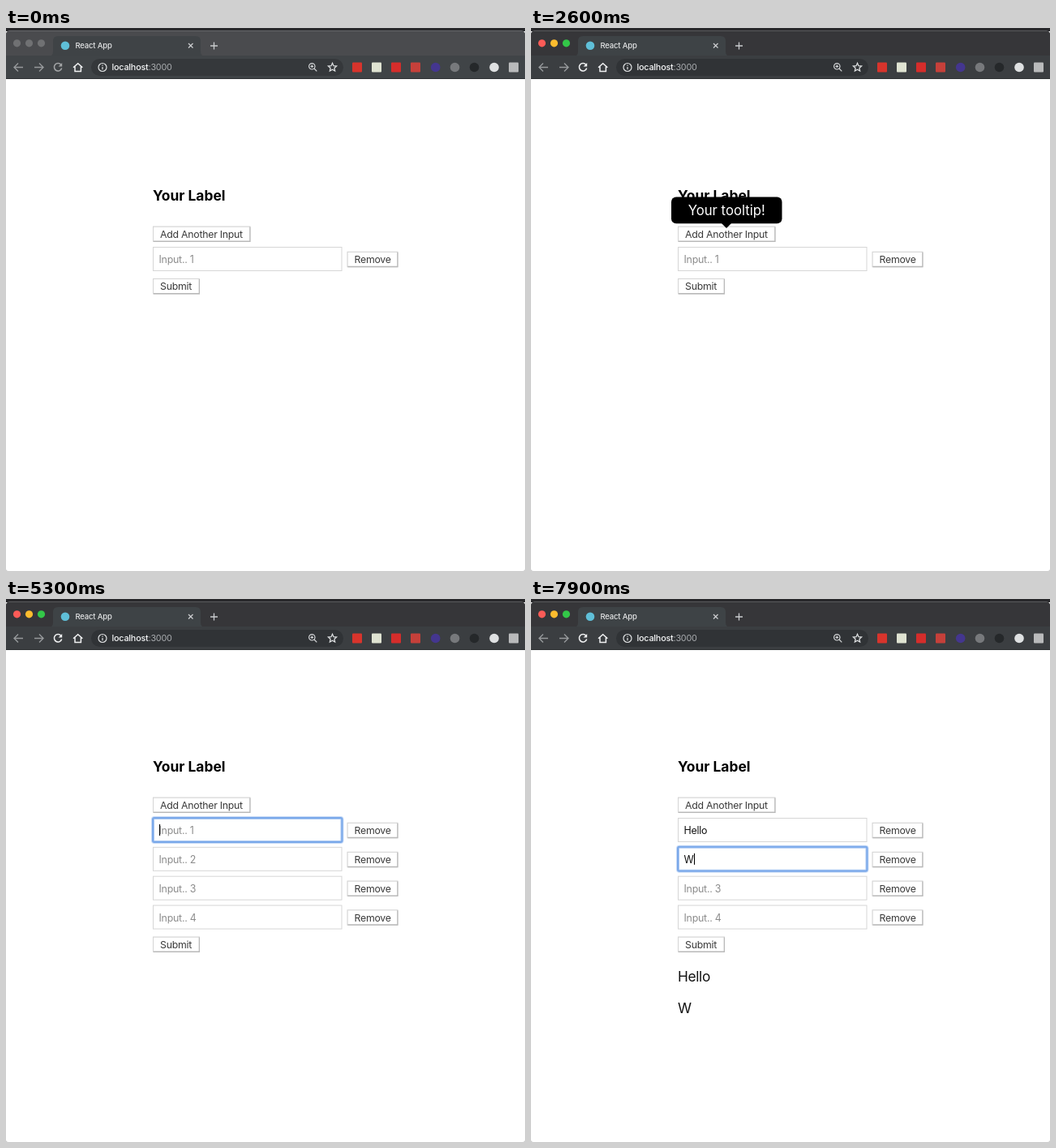
An HTML page with a canvas that plays this animation: 640 by 670 pixels, repeating every 8000 ms.

```html
<!DOCTYPE html>
<html lang="en">
<head>
<meta charset="utf-8">
<title>Dynamic inputs</title>
<style>
  html, body { margin: 0; width: 640px; height: 670px; overflow: hidden; background: #fff; }
  canvas { display: block; width: 640px; height: 670px; }
</style>
</head>
<body>
<canvas id="stage"></canvas>
<script>
const W = 640, H = 670, LOOP = 8000, ROW = 35.85;
const canvas = document.getElementById('stage');
const ctx = canvas.getContext('2d');
const dpr = window.devicePixelRatio || 1;
canvas.width = W * dpr;
canvas.height = H * dpr;

// Timeline, in milliseconds
const ACTIVE = 1000;
const TOOLTIP = [1200, 4950];
const ADDED = [0, 2900, 3700, 4600];
const FOCUS = [5200, 7000];
const TYPING = [
  { word: 'Hello', times: [5650, 5850, 5980, 6100, 6300] },
  { word: 'W', times: [7700] }
];

const passed = (times, t) => times.filter(at => at <= t).length;

function box(x, y, w, h, fill, r = 0) {
  ctx.fillStyle = fill;
  ctx.beginPath();
  ctx.roundRect(x, y, w, h, r);
  ctx.fill();
}

function outline(x, y, w, h, color) {
  ctx.strokeStyle = color;
  ctx.lineWidth = 1;
  ctx.strokeRect(x, y, w, h);
}

function dot(x, y, r, fill) {
  ctx.fillStyle = fill;
  ctx.beginPath();
  ctx.arc(x, y, r, 0, Math.PI * 2);
  ctx.fill();
}

function stroke(path, color, width = 1.4) {
  ctx.strokeStyle = color;
  ctx.lineWidth = width;
  ctx.stroke(new Path2D(path));
}

function text(str, x, y, size, color, { weight = 400, align = 'left', tracking = -0.02 } = {}) {
  ctx.font = `${weight} ${size}px Inter, sans-serif`;
  ctx.letterSpacing = `${tracking * size}px`;
  ctx.textAlign = align;
  ctx.fillStyle = color;
  ctx.fillText(str, x, y);
  return ctx.measureText(str).width;
}

function drawTabs(active) {
  box(0, 0, W, 4, '#28282b');
  box(0, 3, W, 32, active ? '#5a5b5d' : '#66676a', [5, 5, 0, 0]);
  box(0, 4, W, 31, active ? '#363639' : '#4a4b4e', [4, 4, 0, 0]);
  const lights = active ? ['#fc5b57', '#fdbc2e', '#33c748'] : Array(3).fill('#707173');
  lights.forEach((color, i) => dot(13.5 + 15 * i, 18.8, 4.6, color));

  ctx.fillStyle = active ? '#3e4346' : '#3f4346';
  ctx.fill(new Path2D('M52 35Q58 35 58 29V16Q58 10 64 10H234Q240 10 240 16V29Q240 35 246 35Z'));
  dot(73, 21.7, 5.3, '#5fbfd8');
  text('React App', 85.5, 25, 9.5, '#e4e5e6', { weight: 500 });
  stroke('M225 19l5.5 5.5M230.500 19l-5.5 5.5', '#cfd1d3', 1.2);
  stroke('M252 22h9M256.500 17.500v9', '#c9cbcd', 1.3);
}

function drawToolbar(active) {
  box(0, 34, W, 29, active ? '#3b3e41' : '#404447');
  box(0, 62, W, 1, '#2f3234');
  box(105, 38, 311, 21, active ? '#303336' : '#35383b', 10.5);

  const dim = '#96999b', bright = '#f1f2f3';
  stroke('M21 48.500H10.500M15 43.500l-5 5 5 5', dim);
  stroke('M35 48.500H45.500M41 43.500l5 5-5 5', dim);
  const reload = active ? bright : '#a3a5a7';
  stroke('M67.800 45.300A4.700 4.700 0 1 0 68.700 49.500', reload, 1.5);
  ctx.fillStyle = reload;
  ctx.fill(new Path2D('M69.200 43v4.600h-4.600z'));
  stroke('M83 48.800l5.700-5 5.700 5M85 47.500v6h7.400v-6', bright, 1.5);

  stroke('M124 48.500a5 5 0 1 1-10 0a5 5 0 1 1 10 0M119 48v3.300M119 45.600v1.200', '#e1e3e4', 1.2);
  const hostWidth = text('localhost', 130.5, 52, 10.8, '#f6f7f8', { weight: 500 });
  text(':3000', 130.5 + hostWidth, 52, 10.8, '#a9acaf');

  stroke('M381 47.300a3.700 3.700 0 1 1-7.400 0a3.700 3.700 0 1 1 7.400 0M380 50l3.300 3.400M375.500 47.300h3.600M377.300 45.500v3.600', '#d3d5d7', 1.2);
  drawStar(402.5, 48.7, 5.4);
  drawExtensions();
}

function drawStar(x, y, r) {
  ctx.strokeStyle = '#e1e3e4';
  ctx.lineWidth = 1.2;
  ctx.beginPath();
  for (let i = 0; i < 10; i++) {
    const a = i * Math.PI / 5 - Math.PI / 2;
    const d = i % 2 ? r * 0.46 : r;
    ctx.lineTo(x + d * Math.cos(a), y + d * Math.sin(a));
  }
  ctx.closePath();
  ctx.stroke();
}

function drawExtensions() {
  const squares = [[427, '#d8342c'], [451, '#dfe3d2'], [475, '#d52d2b'], [499, '#c6403a'], [620, '#b9babb']];
  squares.forEach(([x, color]) => box(x, 42.5, 12, 12, color, 1));
  const circles = [[529.7, '#44368f'], [553.5, '#77797c'], [577.5, '#25282a'], [602, '#dfe1e2']];
  circles.forEach(([x, color]) => dot(x, 48.5, 5.8, color));
}

// Soft blue halo around a focused control
function drawRing(x, y, w, h, color) {
  ctx.globalAlpha = 0.4;
  box(x - 3, y - 3, w + 6, h + 6, color, 4);
  ctx.globalAlpha = 1;
  box(x - 2, y - 2, w + 4, h + 4, color, 3);
}

function drawButton(label, x, y, w, focused) {
  const h = 19.5;
  if (focused) drawRing(x, y, w, h, '#8fb2f5');
  box(x, y, w, h, '#d4d4d4');
  box(x + 1, y + 1, w - 1, h - 1, '#b9b9b9');
  box(x + 1, y + 1, w - 2.3, h - 2.5, '#fff');
  text(label, x + 9, y + 14.3, 12.3, '#3a3a3a');
}

function drawInput(index, value, focused, caret) {
  const x = 181, y = 270 + ROW * index, w = 233.5, h = 30;
  if (focused) {
    drawRing(x + 1, y + 1, w - 2, h - 2, '#7ba9ea');
    box(x + 1, y + 1, w - 2, h - 2, '#a9c7f2', 1);
    box(x + 2, y + 2, w - 4, h - 4, '#fff');
  } else {
    outline(x + 0.5, y + 0.5, w - 1, h - 1, '#d6d6d6');
  }
  const width = text(value || `Input.. ${index + 1}`, 188.5, y + 20, 12.4, value ? '#111' : '#8c8c8c');
  if (caret) box(189 + (value ? width : 0), y + 8, 1.1, 14, '#000');
}

function drawTooltip() {
  box(173, 208.5, 136.5, 32.7, '#000', 6);
  ctx.fillStyle = '#000';
  ctx.fill(new Path2D('M234.500 240.500h13l-6.500 6.500z'));
  text('Your tooltip!', 241.2, 231.3, 16.7, '#fff', { align: 'center', tracking: 0 });
}

function drawForm(t) {
  const rows = passed(ADDED, t);
  const focus = passed(FOCUS, t) - 1;
  const values = TYPING.map(({ word, times }) => word.slice(0, passed(times, t)));
  const edits = [...FOCUS, ...TYPING.flatMap(entry => entry.times)].filter(at => at <= t);
  const blinkOn = (t - Math.max(...edits)) % 1000 < 500;

  text('Your Label', 181, 213, 17.4, '#000', { weight: 700, tracking: 0 });
  drawButton('Add Another Input', 181, 244.5, 120.5, rows > 1 && focus < 0);
  for (let i = 0; i < rows; i++) {
    drawInput(i, values[i], i === focus, i === focus && blinkOn);
    drawButton('Remove', 420.5, 275.8 + ROW * i, 63);
  }
  drawButton('Submit', 181, 309 + ROW * (rows - 1), 58);
  values.forEach((value, i) => text(value, 181, 472 + 39 * i, 17.3, '#111'));
  if (t >= TOOLTIP[0] && t < TOOLTIP[1]) drawTooltip();
}

function drawCorners() {
  ctx.fillStyle = '#c4c4c4';
  ctx.fill(new Path2D('M0 667Q0 670 3 670H0zM640 667Q640 670 637 670H640z'));
}

function render(now) {
  const t = now % LOOP;
  ctx.setTransform(dpr, 0, 0, dpr, 0, 0);
  box(0, 0, W, H, '#fff');
  drawTabs(t >= ACTIVE);
  drawToolbar(t >= ACTIVE);
  drawForm(t);
  drawCorners();
  requestAnimationFrame(render);
}

requestAnimationFrame(render);
</script>
</body>
</html>
```
